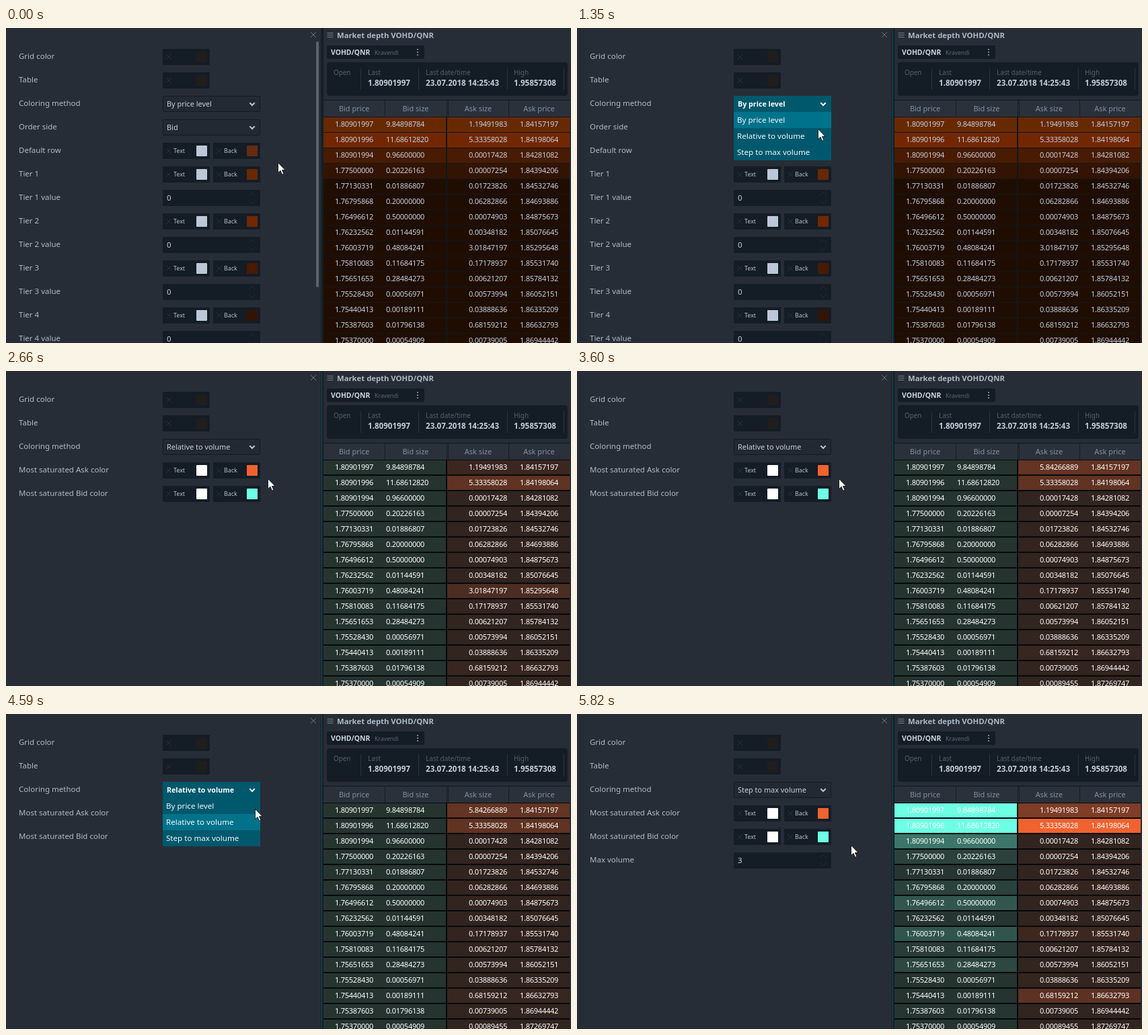
An HTML page that plays this animation: 840 by 469 pixels, repeating every 6480 ms.

```html
<!DOCTYPE html>
<html lang="en">
<head>
<meta charset="utf-8">
<title>Market depth colouring</title>
<style>
  html, body { margin: 0; width: 100%; height: 100%; overflow: hidden; background: #272d36; }
  svg { display: block; }
  text { font-family: "Noto Sans", "Open Sans", sans-serif; white-space: pre; }
  .label { font-size: 11.5px; font-weight: 500; fill: #afbac7; }
  .pick { font-size: 10.9px; font-weight: 500; fill: #c6d0db; }
  .pick.on { font-size: 10.7px; font-weight: 600; fill: #fff; }
  .item { font-size: 11.6px; fill: #f2f8fa; }
  .tiny { font-size: 8.9px; fill: #b4bfcb; }
  .value { font-size: 11.5px; fill: #c6d0db; }
  .title { font-size: 11.3px; font-weight: 600; fill: #aeb9c6; }
  .pair { font-size: 10.4px; font-weight: 700; fill: #cbd5df; }
  .venue { font-size: 8.6px; fill: #5d6875; }
  .caption { font-size: 9.9px; fill: #56616d; }
  .figure { font-size: 11.6px; font-weight: 700; fill: #c3cdd8; }
  .head { font-size: 11px; fill: #8390a3; }
  .cell { font-size: 11px; letter-spacing: -.25px; }
  .line { fill: none; stroke-linecap: square; }
</style>
</head>
<body>
<svg id="stage" width="840" height="469" viewBox="0 0 840 469"></svg>
<script>
(() => {
const LOOP = 6480, ROWS = 15;
const METHODS = ["By price level", "Relative to volume", "Step to max volume"];
const TIERS = ["#632c10", "#672901", "#722700", "#481b02", "#331403"];
const FIELD = "#141c26", BID = [109, 255, 227], ASK = [240, 98, 48];
const BID_BASE = [38, 52, 48], ASK_BASE = [50, 36, 31];

// order book: volumes drive the colours, prices follow a curve
const bidSizes = [9.84898784, 11.6861282, .966, .20226163, .01886807, .2, .5, .01144591,
  .48084241, .11684175, .28484273, .00056971, .00189111, .01796138, .00054909];
const askSizes = [1.19491983, 5.33358028, .00017428, .00007254, .01723826, .06282866, .00074903, .00348182,
  3.01847197, .17178937, .00621207, .00573994, .03888636, .68159212, .00739005, .00089455];
const NEW_ASK = 5.84266889, SOLD = 8;

const bidPrice = i => i < 3
  ? 1.80901997 - i * (i + 1) / 2e8
  : 1.7537 + .0213 * ((14 - i) / 11) ** 2;
const askPrice = i => 1.84157197 + .0311255 * (i / 15) ** 1.6;

// markup helpers
const rect = (x, y, w, h, fill, extra = "") =>
  `<rect x="${x}" y="${y}" width="${w}" height="${h}" fill="${fill}" ${extra}/>`;
const text = (x, y, cls, s, extra = "") =>
  `<text x="${x}" y="${y}" class="${cls}" ${extra}>${s}</text>`;
const line = (d, color, width = 1) =>
  `<path class="line" d="${d}" stroke="${color}" stroke-width="${width}"/>`;
const group = (id, body) => `<g id="${id}">${body}</g>`;
const cross = (x, y, color, r = 3.5) =>
  line(`M${x - r} ${y - r}l${2 * r} ${2 * r}m0 ${-2 * r}l${-2 * r} ${2 * r}`, color);

// settings panel, one field every 35px
const rowY = k => 31 + 35 * k;
const label = (k, s) => text(19, rowY(k) + 15, "label", s);
const chevron = (y, color) => line(`M363 ${y + 11}l3 3l3 -3`, color, 2);

function swatch(x, k, name, color) {
  const y = rowY(k);
  return rect(x, y, 70, 24, FIELD, 'rx="1"') + cross(x + 9, y + 12, "#28303a") +
    text(x + 16, y + 15, "tiny", name) + rect(x + 50, y + 4, 16, 16, color, 'rx="1"');
}

const colors = (k, name, fore, back) =>
  label(k, name) + swatch(233, k, "Text", fore) + swatch(308, k, "Back", back);

function number(k, name, value) {
  const y = rowY(k);
  return label(k, name) + rect(233, y, 145, 24, FIELD, 'rx="1"') + text(239, y + 16, "value", value) +
    line(`M361.5 ${y + 8}l4.5 -4l4.5 4m-9 8l4.5 4l4.5 -4`, "#232c36");
}

function select(k, name, value, id) {
  const y = rowY(k);
  return label(k, name) +
    rect(233.5, y + .5, 144, 23, "#222932", `id="${id}" rx="1" stroke="#131a21"`) +
    text(239, y + 16, "pick", value, `id="${id}Text"`) + chevron(y, "#bac4cf");
}

function tierRows() {
  let out = select(3, "Order side", "Bid", "side") + colors(4, "Default row", "#bcc8d8", TIERS[0]);
  for (let i = 1; i < TIERS.length; i++)
    out += colors(3 + 2 * i, `Tier ${i}`, "#bcc8d8", TIERS[i]) + number(4 + 2 * i, `Tier ${i} value`, 0);
  return out;
}

const dropdown = () =>
  rect(233, 101, 145, 96, "#00586c") + rect(233, 125, 145, 24, "#00738b", 'id="mark"') +
  text(239, 117, "pick on", "", 'id="openText"') + chevron(101, "#fff") +
  METHODS.map((s, i) => text(238, 141 + 24 * i, "item", s)).join("");

function settings() {
  const plain = (k, name) => label(k, name) + swatch(233, k, "", "#1f1e1d");
  return rect(0, 0, 468, 469, "#272d36") + cross(457, 10, "#6b7580") +
    plain(0, "Grid color") + plain(1, "Table") + select(2, "Coloring method", "", "method") +
    group("tiers", tierRows()) +
    group("shades", colors(3, "Most saturated Ask color", "#fff", "#f06230") +
      colors(4, "Most saturated Bid color", "#fff", "#6dffe3")) +
    group("hover", rect(308.5, 136.5, 69, 23, "none", 'stroke="#59636e"') + cross(317, 148, "#747f8b")) +
    group("volume", number(5, "Max volume", 3)) +
    rect(461, 20, 4, 366, "#59626d", 'id="bar" rx="2"') +
    rect(468, 0, 4, 469, "#161c23") + rect(469, 0, 1, 469, "#0b5566", 'id="edge"') +
    group("drop", dropdown());
}

function market() {
  const info = [[487, "Open", ""], [538, "Last", "1.80901997"],
    [624, "Last date/time", "23.07.2018 14:25:43"], [755, "High", "1.95857308"]];
  const heads = [[517.5, "Bid price"], [609, "Bid size"], [702, "Ask size"], [792.5, "Ask price"]];
  return rect(472, 0, 368, 469, "#272d36") +
    line("M478 7.5h8m-8 3h8m-8 3h8", "#77828e") + text(492, 15, "title", "Market depth VOHD/QNR") +
    rect(477, 26, 145, 20, FIELD, 'rx="2"') + text(483, 40, "pair", "VOHD/QNR") + text(548, 40, "venue", "Kravendi") +
    [31, 35, 39].map(y => rect(611, y, 2, 2, "#77828e")).join("") +
    rect(477, 51, 358, 50, FIELD, 'rx="4"') +
    [527, 613, 745, 829].map(x => rect(x, 60, 1, 32, "#2b333c")).join("") +
    info.map(([x, a, b]) => text(x, 70, "caption", a) + text(x, 86, "figure", b)).join("") +
    rect(472, 107, 366, 362, "#12181f") + rect(472, 108, 366, 24, "#2a313b") +
    [563, 655, 657, 747].map(x => rect(x, 108, 1, 24, "#151c23")).join("") +
    heads.map(([x, s]) => text(x, 124, "head", s, 'text-anchor="middle"')).join("") +
    group("book", "");
}

const mix = (a, b, p) => `rgb(${a.map((v, i) => Math.round(v + (b[i] - v) * Math.min(1, p)))})`;

// look: index into METHODS; trades: how often the ask side has changed
function book(look, trades) {
  const ink = look ? "#fff" : "#c3cfe0", h = look ? 21 : 22;
  const cell = (x, y, v, end) =>
    text(x, y + 14, "cell", v.toFixed(8), `fill="${ink}"${end ? ' text-anchor="end"' : ""}`);
  let out = rect(472, 132, 366, 337, look ? "#06090b" : "#12171b");
  for (let i = 0; i < ROWS; i++) {
    const y = 133 + 23 * i;
    const a = trades && i >= SOLD ? i + 1 : i;
    const askSize = trades === 1 && i === 0 ? NEW_ASK : askSizes[a];
    const left = look ? mix(BID_BASE, BID, look === 2 ? bidSizes[i] / 3 : 0) : TIERS[i + 1] || "#1f0d01";
    const right = look ? mix(ASK_BASE, ASK, askSize / (look === 2 ? 3 : 22)) : left;
    out += rect(472, y, 182, h, left) + rect(656, y, 182, h, right) +
      cell(489, y, bidPrice(i)) + cell(565, y, bidSizes[i]) +
      cell(745, y, askSize, true) + cell(764, y, askPrice(a));
  }
  return out;
}

const $ = id => document.getElementById(id);
$("stage").innerHTML = settings() + market() +
  '<path id="arrow" d="M.5 .5V15.7L4 12.3L6.6 18.2L9 17.2L6.4 11.5H11Z" fill="#fff" stroke="#11161b" stroke-width=".9"/>';

// pointer legs: start, end, x, y, and how strongly the move slows down
const LEGS = [
  [50, 580, 364, 114, 2], [1190, 1480, 357, 159, 2], [1860, 2070, 352, 160, 2], [2220, 2330, 389, 160, 2],
  [3600, 4160, 369, 119, 2], [4260, 4880, 371, 184, .55], [5080, 5410, 407, 195, 2]
];
const ramp = (t, a, b) => Math.max(0, Math.min(1, (t - a) / (b - a)));

function pointer(t) {
  let x = 404, y = 200;
  for (const [a, b, toX, toY, slow] of LEGS) {
    const p = 1 - (1 - ramp(t, a, b)) ** slow;
    x += (toX - x) * p;
    y += (toY - y) * p;
  }
  return [Math.round(x), Math.round(y)];
}

const stageOf = (t, first, second) => (t >= first) + (t >= second);
const within = (t, a, b) => t >= a && t < b;
const show = (id, on) => $(id).style.display = on ? "" : "none";

let drawn = "";
function draw(t) {
  const mode = stageOf(t, 1730, 5080);
  const look = stageOf(t, 2660, 5820);
  const trades = stageOf(t, 2940, 5820);
  const opened = within(t, 710, 1730) || within(t, 4260, 5080);

  show("tiers", mode === 0);
  show("shades", mode > 0);
  show("volume", mode === 2);
  show("hover", within(t, 1800, 2480));
  show("drop", opened);
  $("drop").setAttribute("opacity", ramp(t, mode ? 4210 : 660, mode ? 4410 : 860));
  $("methodText").textContent = $("openText").textContent = METHODS[mode];

  // highlights lag a little behind the pointer
  const [lagX, lagY] = pointer(t - 60);
  const item = lagY < 140 ? mode : Math.min(2, Math.floor((lagY - 125) / 24));
  $("mark").setAttribute("y", 125 + 24 * item);
  const over = lagX < 378 && within(lagY, 101, 125);
  $("method").setAttribute("stroke", over ? "#4d5762" : "#131a21");

  const focus = ramp(t, 660, 1040);
  $("bar").setAttribute("opacity", 1 - focus);
  $("edge").setAttribute("opacity", .25 + .75 * focus);

  const key = `${look}${trades}`;
  if (key !== drawn) {
    $("book").innerHTML = book(look, trades);
    drawn = key;
  }
  $("arrow").setAttribute("transform", `translate(${pointer(t)})`);
}

const begin = performance.now();
function tick() {
  draw((performance.now() - begin) % LOOP);
  requestAnimationFrame(tick);
}
tick();
})();
</script>
</body>
</html>
```
